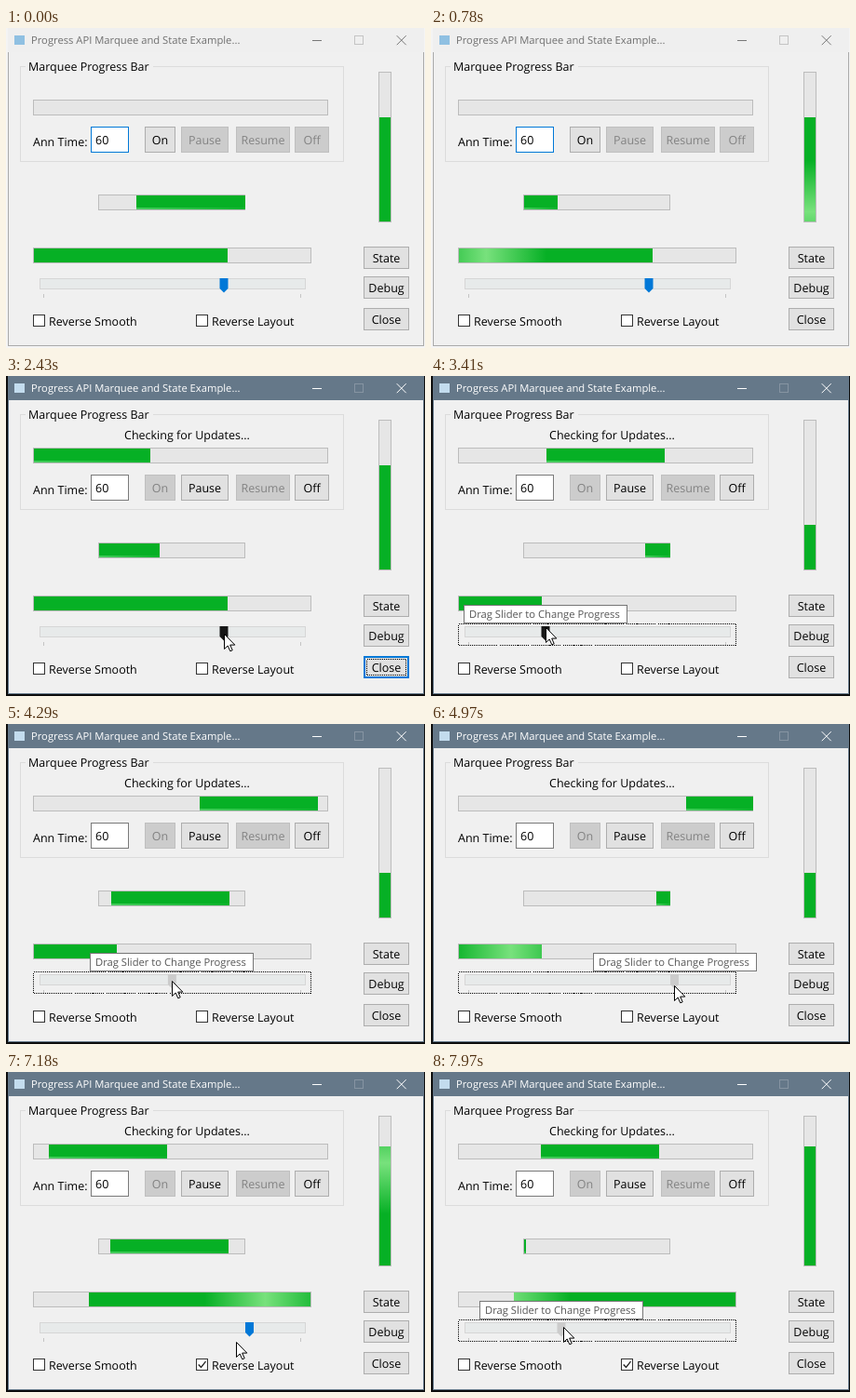
Animation, 450 px wide and 344 px high, one loop 8 s. Source, as an HTML page:

```html
<!DOCTYPE html>
<html lang="en">
<head>
<meta charset="utf-8">
<title>Progress API Marquee and State Example</title>
<style>
  html, body { margin: 0; width: 100%; height: 100%; overflow: hidden; background: #f0f0f0; }
  svg { display: block; }
  text { font: 12.5px "Open Sans", "Noto Sans", sans-serif; fill: #000; text-rendering: geometricPrecision; }
  text.small { font-size: 11.22px; }
  rect, line { shape-rendering: crispEdges; }
</style>
</head>
<body>
<svg id="stage" width="450" height="344" viewBox="0 0 450 344"></svg>
<script>
const LOOP = 8000, TICK = 97.1;
const GREEN = '#06b025', BLUE = '#0078d7';
const stage = document.getElementById('stage');

// Moments of the session, in ticks
const START = 12, DRAG1 = 26, DROP1 = 35, DRAG2 = 40, DROP2 = 52, CHECK = 66, DRAG3 = 78;

// A one pixel outlined box covering w by h pixels
const box = (x, y, w, h, fill, stroke, extra = '') =>
  `<rect x="${x + .5}" y="${y + .5}" width="${w - 1}" height="${h - 1}" fill="${fill}" stroke="${stroke}" ${extra}/>`;
const label = (x, y, str, extra = '') => `<text x="${x}" y="${y}" ${extra}>${str}</text>`;
const button = (id, x, y, w, h, str, base) =>
  `<g id="${id}">${box(x, y, w, h, '#e1e1e1', '#adadad')}${label(x + w / 2, base, str, 'text-anchor="middle"')}</g>`;
const checkbox = (id, x, str) =>
  box(x, 308, 13, 13, '#fff', '#333', `id="${id}"`) + label(x + 17, 320, str);
const trough = (x, y, w, h) => box(x, y, w, h, '#e6e6e6', '#bcbcbc');
const block = (id, y) =>
  `<g><rect id="${id}" y="${y}" height="15" fill="${GREEN}"/>
   <rect id="${id}Edge" y="${y + 13}" height="2" fill="url(#edge)"/></g>`;
const filled = (id, x, y, w, h, grad) =>
  `<svg id="${id}" x="${x}" y="${y}" width="${w}" height="${h}" overflow="hidden">
   <rect width="300" height="300" fill="${GREEN}"/>
   <rect id="${id}Glow" width="${w}" height="${h}" fill="url(#${grad})"/></svg>`;
const glow = (id, dir) =>
  `<linearGradient id="${id}" x1="0" y1="0" ${dir}>
   <stop offset="0" stop-color="#8cea8c" stop-opacity="0"/>
   <stop offset=".5" stop-color="#8cea8c" stop-opacity=".85"/>
   <stop offset="1" stop-color="#8cea8c" stop-opacity="0"/></linearGradient>`;

stage.innerHTML = `
  <defs>
    ${glow('glowX', 'x2="1" y2="0"')}${glow('glowY', 'x2="0" y2="1"')}
    <linearGradient id="edge">
      <stop offset="0" stop-color="#5fd873" stop-opacity=".7"/>
      <stop offset="1" stop-color="#5fd873" stop-opacity=".1"/>
    </linearGradient>
  </defs>
  <rect id="outside" width="450" height="344"/>
  ${box(2, -1, 447, 343, '#f0f0f0', '#aaa', 'id="frame"')}
  <rect id="caption" x="2" width="447" height="26"/>
  <rect id="icon" x="9" y="8" width="11" height="10"/>
  <text id="title" class="small" x="27" y="17">Progress API Marquee and State Example...</text>
  <g id="controls" fill="none">
    <path d="M329 13.5h10" shape-rendering="crispEdges"/><path d="M419.7 8.2l10 10m0-10l-10 10"/>
  </g>
  ${box(374, 8, 10, 10, 'none', '#bbb', 'id="maximize"')}

  ${box(15, 41, 348, 103, 'none', '#dcdcdc')}
  <rect x="21" y="38" width="137" height="8" fill="#f0f0f0"/>
  ${label(24, 46, 'Marquee Progress Bar')}
  ${label(127, 68, 'Checking for Updates...', 'id="status"')}
  ${trough(29, 77, 317, 17)}${block('wide', 78)}
  ${label(29, 127, 'Ann Time:')}
  ${box(91, 106, 41, 28, '#fff', '#7a7a7a', 'id="edit"')}${label(96, 125, '60')}
  ${button('on', 149, 106, 33, 28, 'On', 125)}
  ${button('pause', 188, 106, 51, 28, 'Pause', 125)}
  ${button('resume', 247, 106, 58, 28, 'Resume', 125)}
  ${button('off', 310, 106, 37, 28, 'Off', 125)}

  ${trough(99, 179, 158, 17)}${block('narrow', 180)}
  ${trough(29, 236, 299, 17)}${filled('bar', 30, 237, 297, 15, 'glowX')}
  ${trough(400, 47, 14, 162)}${filled('tower', 401, 48, 12, 160, 'glowY')}

  ${box(36, 269, 286, 12, '#e7eaea', '#d6d6d6')}
  <path d="M40.5 286v4M316.5 286v4" stroke="#c4c4c4" shape-rendering="crispEdges"/>
  ${box(29, 266, 299, 24, 'none', '#000', 'id="focus" stroke-dasharray="1 1"')}
  <path id="thumb" d="M-4.5 269h9v11l-4.5 4.5l-4.5-4.5z"/>

  ${checkbox('smooth', 29, 'Reverse Smooth')}
  ${checkbox('layout', 204, 'Reverse Layout')}
  <path id="mark" d="M206.7 314.5l2.8 3l5-6.3" fill="none" stroke="#222" stroke-width="1.3"/>
  ${button('state', 384, 235, 49, 24, 'State', 252)}
  ${button('debug', 384, 267, 49, 24, 'Debug', 284)}
  ${button('close', 384, 301, 49, 24, 'Close', 318)}
  <g id="closeFocus" fill="none" shape-rendering="crispEdges">
    <rect x="385" y="302" width="47" height="22" stroke="${BLUE}" stroke-width="2"/>
    <rect x="387.5" y="304.5" width="42" height="17" stroke="#000" stroke-dasharray="1 1"/>
  </g>
  <g id="tip">${box(-88, 246, 176, 20, '#fff', '#767676')}
    ${label(-82, 260, 'Drag Slider to Change Progress', 'class="small" style="fill:#575757"')}</g>
  <path id="cursor" d="M.5 .5v16l3.7-3.5l2.6 5.8l2.4-1l-2.5-5.7h5.1z" fill="#fff" stroke="#000"/>
`;

const $ = {};
stage.querySelectorAll('[id]').forEach(el => $[el.id] = el);

const set = (el, attrs) => { for (const k in attrs) el.setAttribute(k, attrs[k]); };
const show = (el, yes) => set(el, { visibility: yes ? 'visible' : 'hidden' });
const mod = (a, b) => ((a % b) + b) % b;

// Linear value at tick n from rows of [tick, a, b...]
function along(rows, n, col = 1) {
  let i = 0;
  while (i < rows.length - 2 && n > rows[i + 1][0]) i++;
  const a = rows[i], b = rows[i + 1];
  const k = Math.min(1, Math.max(0, (n - a[0]) / (b[0] - a[0])));
  return a[col] + (b[col] - a[col]) * k;
}

// Marquee positions run on without wrapping
const wideRun = [[12, -95], [13, -86], [25, 28], [35, 124], [51, 274], [64, 399], [82, 561]];
const narrowRun = [[0, 140], [13, 388], [25, 606], [35, 798], [51, 1094], [64, 1348], [82, 1679]];
const pointer = [
  [10, 262, 300], [11, 200, 170], [12, 170, 118], [15, 170, 118], [23, 234, 277], [26, 234, 277],
  [34, 123, 269], [40, 123, 272], [50, 261, 281], [52, 261, 281], [54, 252, 306], [60, 218, 318],
  [70, 218, 318], [76, 262, 276], [79, 262, 276], [81, 234, 275], [82, 142, 274]
];
const slide = [[26, 234], [34, 123], [40, 123], [50, 261.5], [79, 261.5], [81, 233], [82, 140]];

function marquee(id, run, n, left, right) {
  const size = 127, low = left - size;
  const x = mod(along(run, n) - low, right - low) + low;
  const a = Math.max(left, x), b = Math.min(right, x + size);
  const attrs = { x: a, width: Math.max(0, b - a) };
  set($[id], attrs);
  set($[id + 'Edge'], attrs);
}

function enable(id, yes) {
  const [r, t] = $[id].children;
  set(r, { fill: yes ? '#e1e1e1' : '#ccc', stroke: yes ? '#adadad' : '#bfbfbf' });
  t.style.fill = yes ? '#000' : '#838383';
}

// Distance covered by the latest sweep of light
function sweep(starts, n, speed) {
  const s = starts.filter(v => v <= n).pop();
  return s === undefined ? -999 : (n - s) * speed;
}

function drawWindow(active) {
  set($.outside, { fill: active ? '#0c0c0c' : '#f4f4f4' });
  set($.frame, { stroke: active ? '#657889' : '#aaa' });
  set($.caption, { fill: active ? '#657889' : '#efefef' });
  set($.icon, { fill: active ? '#c3dcee' : '#8fc0e2' });
  $.title.style.fill = active ? '#fff' : '#707070';
  set($.controls, { stroke: active ? '#fff' : '#777' });
  set($.maximize, { stroke: active ? '#8694a2' : '#c4c4c4' });
  set($.edit, { stroke: active ? '#7a7a7a' : BLUE });
}

function drawBars(n) {
  const value = n < DROP1 ? .7 : n < DROP2 ? .3 : .8;
  const reversed = n >= CHECK;
  const w = Math.round(297 * value), h = Math.round(160 * value);
  const far = sweep([6.8, 48.7, 72], n, 24.3), up = sweep([7, 63.5], n, 10.5);
  set($.bar, { x: reversed ? 327 - w : 30, width: w });
  set($.barGlow, { x: (reversed ? w - far : far) - 65, width: 130 });
  set($.tower, { y: 208 - h, height: h });
  set($.towerGlow, { y: h - up - 55, height: 110 });
  marquee('narrow', narrowRun, n, 100, 257);
  marquee('wide', wideRun, n, 30, 346);
}

function drawSlider(n, cx, cy) {
  const x = along(slide, n);
  const pressed = (n >= DRAG1 && n < DROP1) || (n >= DRAG2 && n < DROP2) || n >= DRAG3;
  const hot = n >= START && Math.abs(cx - x) <= 5 && cy >= 269 && cy <= 284;
  set($.thumb, { transform: `translate(${x} 0)`, fill: pressed ? '#ccc' : hot ? '#171717' : BLUE });
  show($.focus, n >= DRAG1 && (n < CHECK || n >= DRAG3));
  show($.tip, pressed || n === DROP1);
  set($.tip, { transform: `translate(${Math.round(x)} 0)` });
}

function draw(ms) {
  const n = Math.floor((ms % LOOP + 20) / TICK);
  const running = n >= START;
  const cx = along(pointer, n), cy = along(pointer, n, 2);

  drawWindow(running);
  drawBars(n);
  drawSlider(n, cx, cy);

  show($.status, running);
  show($.wide.parentNode, running);
  enable('on', !running);
  enable('pause', running);
  enable('resume', false);
  enable('off', running);

  const over = cx >= 204 && cx <= 310 && cy >= 308 && cy <= 322;
  set($.layout, { stroke: over && running ? BLUE : '#333' });
  show($.mark, n >= CHECK);
  show($.closeFocus, running && n < DRAG1);
  show($.cursor, n >= 10);
  set($.cursor, { transform: `translate(${Math.round(cx)} ${Math.round(cy)})` });
}

const began = performance.now();
function loop() {
  draw(performance.now() - began);
  requestAnimationFrame(loop);
}
loop();
</script>
</body>
</html>
```
